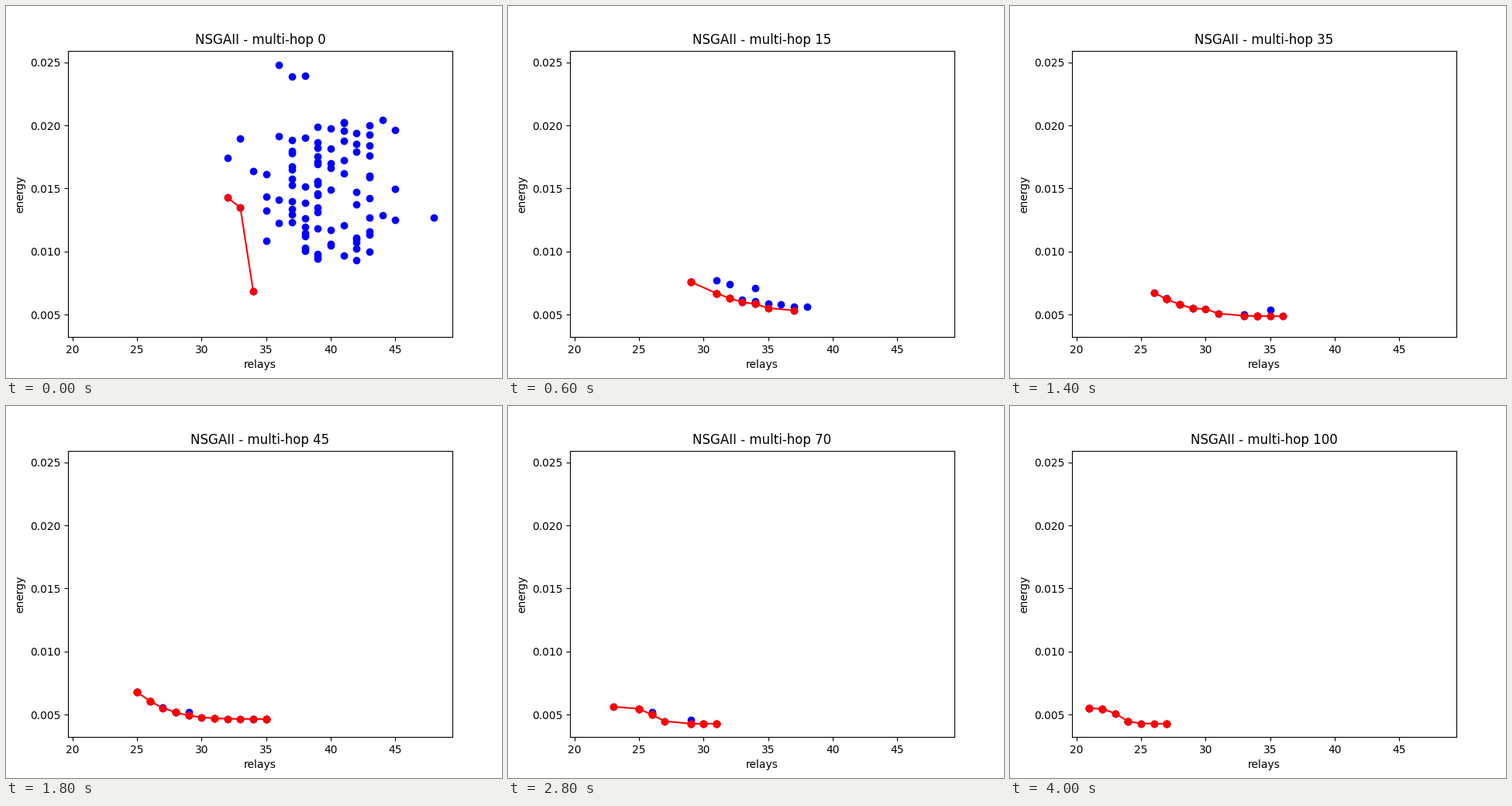
A matplotlib script for the animation above (4.2 s loop, 640 px wide and 480 px high).

```python
import math
import random

import matplotlib.pyplot as plt
import numpy as np
from matplotlib.animation import FuncAnimation

FRAMES, STEP, INTERVAL = 21, 5, 200
UNIT = 1e-5  # energies below are multiples of this
GOLDEN = (math.sqrt(5) - 1) / 2

# First front and the outermost individuals of the starting population
START_EDGE = [(32, 1428), (33, 1348), (34, 686), (32, 1741),
              (36, 2483), (37, 2385), (38, 2397), (48, 1268)]

# How the front evolves, at a few generations
KEY_GENS = (0, 25, 45, 70, 100)
FEWEST = (30.3, 28.2, 24.8, 22.9, 20.6)
MOST = (37, 37.2, 35, 31.4, 27.2)
HIGHEST = (900, 667, 680, 563, 550)
LOWEST = (570, 508, 465, 428, 428)
BEND = (1.2, 2.2, 4, 4, 4)
STEPPED = (0, 0, 0, 1, 1)


def at(gen, values):
    return float(np.interp(gen, KEY_GENS, values))


def start_population(rng):
    """Even spread of energies over a hump of relay counts."""
    cloud = []
    for i in range(88):
        relays = round(rng.triangular(32.5, 46.5, 38))
        low = 1500 if relays < 34 else 930
        cloud.append((relays, low + (2050 - low) * (i * GOLDEN % 1)))
    return START_EDGE + cloud


def front_energy(gen, u):
    """Energy along the front, u running from fewest to most relays."""
    u = min(u, 1)
    power = (1 - u) ** at(gen, BEND)
    drop = 1 / (1 + math.exp(15 * (u - 0.38)))
    mix = at(gen, STEPPED)
    low, high = at(gen, LOWEST), at(gen, HIGHEST)
    return low + (high - low) * ((1 - mix) * power + mix * drop)


def evolved_population(gen, rng):
    left, right = round(at(gen, FEWEST)), round(at(gen, MOST))
    early = math.exp(-gen / 5)

    def energy(relays):
        return front_energy(gen, (relays - left) / (right - left))

    inner = [x for x in range(left + 1, right) if rng.random() < 0.8]
    people = [(x, energy(x)) for x in [left, *inner, right]]
    reach = right + round(24 * early)
    for _ in range(round(8 * (1 - gen / 100) + 120 * early)):
        x = rng.randint(left, reach)
        people.append((x, energy(x) + rng.expovariate(1 / (18 + 700 * early))))
    return people


def pareto_front(people):
    front = []
    for relays, energy in sorted(people):
        if not front or energy < front[-1][1]:
            front.append((relays, energy))
    return front


def scaled(people):
    return np.array(people) * (1, UNIT)


fig, ax = plt.subplots(figsize=(6.4, 4.8), dpi=100)
ax.set(xlim=(19.66, 49.42), ylim=(0.003214, 0.025931), xlabel="relays", ylabel="energy")
title = ax.set_title("")
all_dots = ax.scatter([], [], color="blue")
front_dots = ax.scatter([], [], color="red")
front_line, = ax.plot([], [], color="red")


def update(frame):
    gen = frame * STEP
    rng = random.Random(gen)
    people = evolved_population(gen, rng) if gen else start_population(rng)
    front = pareto_front(people)
    # Later individuals often coincide, which makes their dots heavier.
    copies = (1, 4, 4) if gen else (1,)
    all_dots.set_offsets(scaled(people))
    front_dots.set_offsets(scaled([p for p in front for _ in range(rng.choice(copies))]))
    front_line.set_data(*scaled(front).T)
    title.set_text(f"NSGAII - multi-hop {gen}")
    return all_dots, front_dots, front_line, title


anim = FuncAnimation(fig, update, frames=FRAMES, interval=INTERVAL, repeat=True, repeat_delay=0)
plt.show()
```
